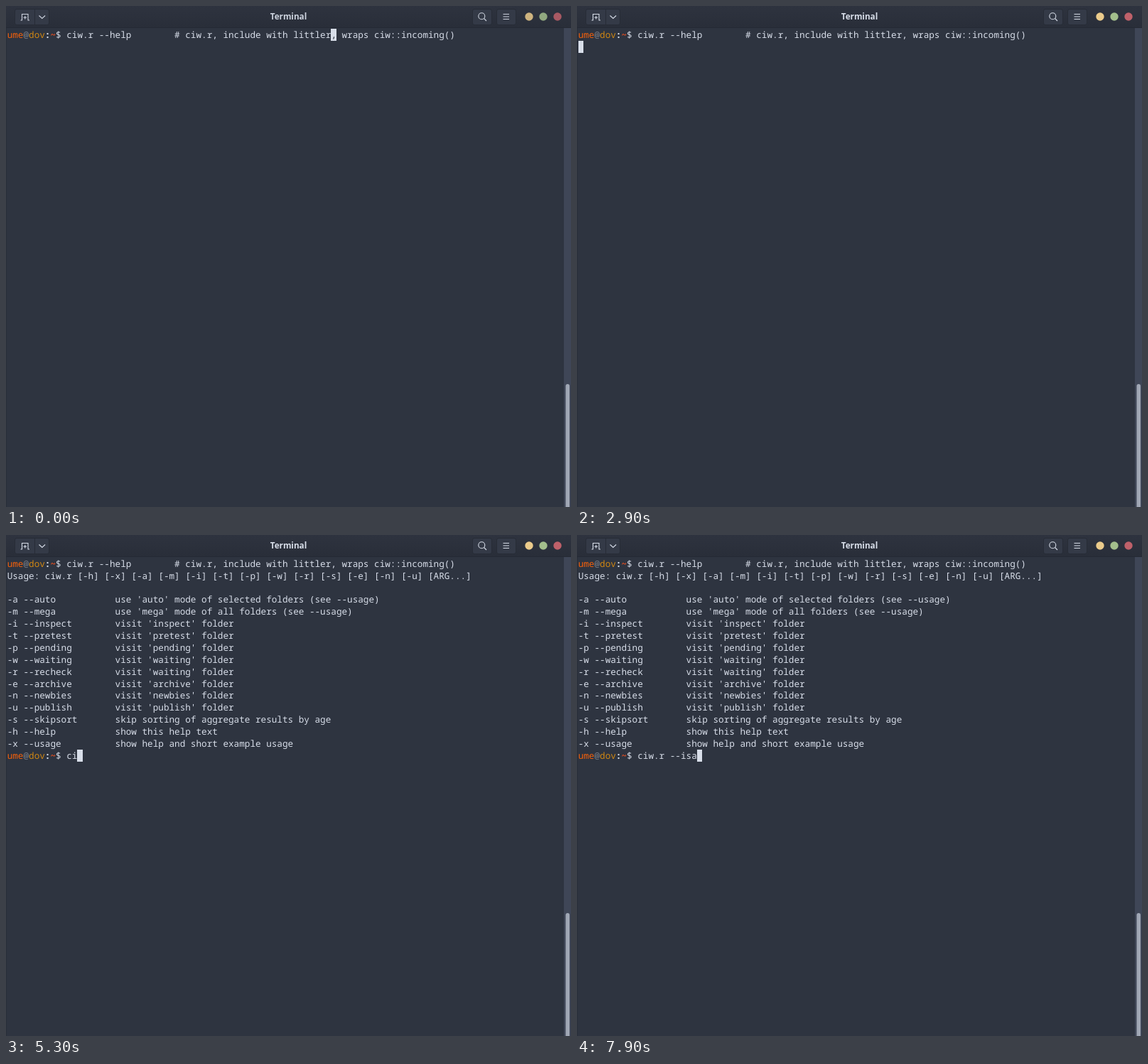
An HTML page for the animation above (8000 ms loop, 795 by 705 pixels).

```html
<!DOCTYPE html>
<html lang="en">
<head>
<meta charset="utf-8">
<title>Terminal</title>
<style>
  html, body { margin: 0; width: 100%; height: 100%; overflow: hidden; background: #2e3440; }
  #win { position: relative; width: 795px; height: 705px; overflow: hidden; background: #2e3440; }
  svg { position: absolute; left: 0; top: 0; }
  #title { font: 700 11.7px "Open Sans", "Noto Sans", sans-serif; fill: #d8dee9; }
  .icon { fill: none; stroke: #d8dee9; stroke-width: 1.1; }
  .blur .lights { opacity: .85; }
  .blur #title, .blur .icon { opacity: .94; }
  pre, #cursor {
    position: absolute; margin: 0; white-space: pre; color: #d8dee9;
    font: 12.66px/16.87px "Noto Sans Mono", "DejaVu Sans Mono", monospace;
    text-rendering: geometricPrecision; font-variant-ligatures: none;
  }
  pre { left: 1.7px; top: 31.75px; }
  #cursor { width: 7.6px; height: 17px; background: #d8dee9; color: #2e3440; }
  .user { color: #f4610b; }
  .at { color: #7b808a; }
  .host { color: #d08712; }
  .dir { color: #f4511e; font-weight: 700; }
</style>
</head>
<body>
<div id="win">
  <svg width="795" height="705">
    <defs>
      <linearGradient id="bar" x2="0" y2="1">
        <stop stop-color="#2e333f"/><stop offset="1" stop-color="#292e39"/>
      </linearGradient>
    </defs>
    <rect width="795" height="30" fill="url(#bar)"/>
    <rect y="30" width="795" height="1" fill="#252a34"/>
    <rect y="31" width="1" height="674" fill="#292e39"/>
    <rect x="785" y="31" width="10" height="674" fill="#3f4657"/>
    <rect x="787.5" y="532" width="5.5" height="180" rx="2.7" fill="#a0a7b5"/>
    <g fill="#343a47" stroke="#272c36">
      <rect x="12.5" y="4.5" width="48" height="22" rx="2.5"/>
      <rect x="656.5" y="4.5" width="27" height="22" rx="2.5"/>
      <rect x="690.5" y="4.5" width="27" height="22" rx="2.5"/>
      <path d="M40.5 4.5v22"/>
    </g>
    <path class="icon" d="M20.5 20h2v-8.5h8.5v8.500h2M26.800 14v4.500M24.500 16.300h4.500M46.500 13.500l4.300 4 4.300-4M672.500 17.500l3.500 3.500M699.500 11.500h8.500M699.500 15h8.500M699.500 18.500h8.500"/>
    <circle class="icon" cx="669.3" cy="14.3" r="4.5"/>
    <g class="lights">
      <circle cx="736" cy="15" r="5.7" fill="#ebcb8b"/>
      <circle cx="756" cy="15" r="5.7" fill="#a3be8c"/>
      <circle cx="776" cy="15" r="5.7" fill="#bf616a"/>
    </g>
    <text id="title" x="397.5" y="19.3" text-anchor="middle">Terminal</text>
  </svg>
  <pre id="screen"></pre>
  <div id="cursor"></div>
</div>
<script>
const LOOP = 8000, CELL = 7.596, ROW = 16.87, PROMPT = 11;
const $ = id => document.getElementById(id);
const prompt = '<span class="user">ume</span><span class="at">@</span>' +
  '<span class="host">dov</span><b>:</b><span class="dir">~</span>$ ';
const command = 'ciw.r --help        # ciw.r, include with littler, wraps ciw::incoming()';

const visit = (flag, name, folder = name) => [`-${flag} --${name}`, `visit '${folder}' folder`];
const options = [
  ['-a --auto', "use 'auto' mode of selected folders (see --usage)"],
  ['-m --mega', "use 'mega' mode of all folders (see --usage)"],
  visit('i', 'inspect'), visit('t', 'pretest'), visit('p', 'pending'),
  visit('w', 'waiting'), visit('r', 'recheck', 'waiting'), visit('e', 'archive'),
  visit('n', 'newbies'), visit('u', 'publish'),
  ['-s --skipsort', 'skip sorting of aggregate results by age'],
  ['-h --help', 'show this help text'],
  ['-x --usage', 'show help and short example usage'],
];
const flags = [...'hxamitpwrsenu'].map(f => `[-${f}]`).join(' ');
const help = [`Usage: ciw.r ${flags} [ARG...]`, '',
  ...options.map(([flag, text]) => flag.padEnd(20) + text)].join('\n');

// Cursor as [time, column, row]; a null column hides it
const moves = [
  [0, 60, 0], [500, null], [1000, 60, 0], [1100, 11, 0], [1700, null],
  [2000, 11, 0], [2100, 83, 0], [2700, null], [2900, 0, 1],
  [3300, 11, 16], [3500, null], [4100, 11, 16],
];
// Key presses after the help text; '<' is backspace
const keys = [
  [4500, 'c'], [4700, 'i'], [4900, 'e'], [5300, '<'], [5400, 'w'], [5700, '.'],
  [6200, 'r'], [6400, ' '], [6700, '-'], [6900, '-'], [7100, 'i'], [7300, 's'],
  [7500, 'a'], [7700, 'g'], [7900, '<'],
];

let shown;
function draw(now) {
  const t = now % LOOP;
  const typed = keys.filter(k => k[0] <= t)
    .reduce((s, [, key]) => key === '<' ? s.slice(0, -1) : s + key, '');
  let [, col, row] = moves.findLast(m => m[0] <= t);
  if (typed) col = PROMPT + typed.length;

  const html = prompt + command + (t < 3300 ? '' : '\n' + help + '\n' + prompt + typed);
  if (html !== shown) $('screen').innerHTML = shown = html;

  const cursor = $('cursor');
  cursor.hidden = col === null;
  cursor.style.left = 1.7 + col * CELL + 'px';
  cursor.style.top = 32.2 + (row || 0) * ROW + 'px';
  cursor.textContent = row === 0 ? command[col - PROMPT] || '' : '';
  $('win').classList.toggle('blur', t < 100);
}
function tick() {
  draw(performance.now());
  requestAnimationFrame(tick);
}
tick();
</script>
</body>
</html>
```
